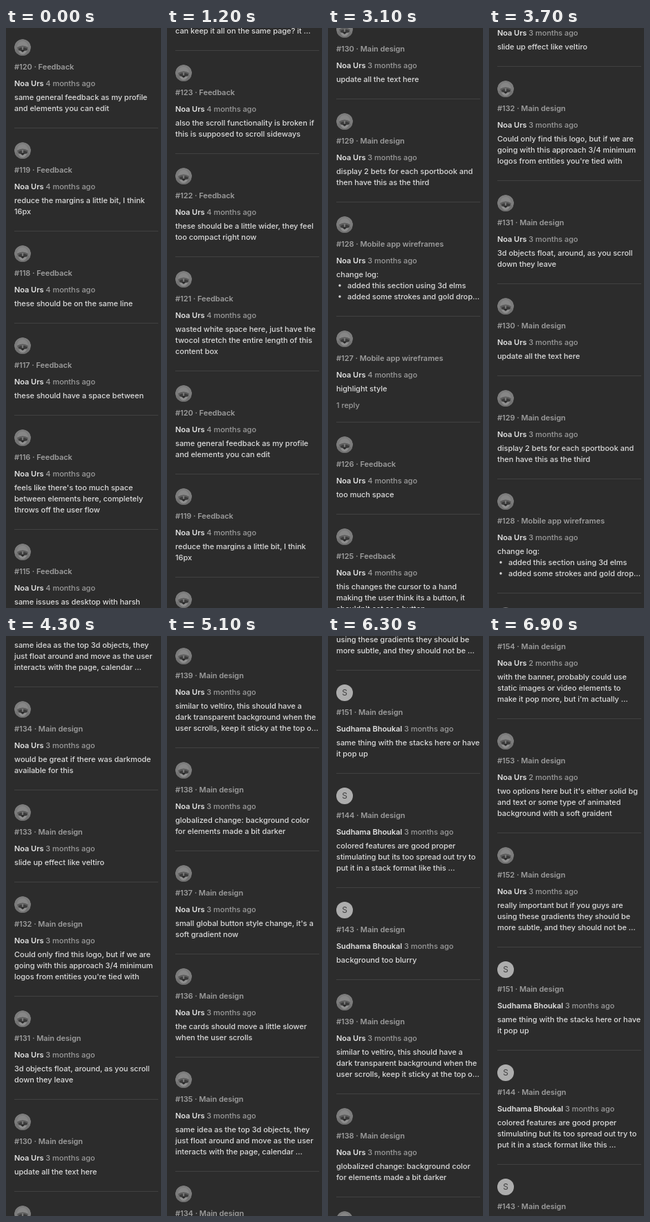
These frames come from a looping animation (224x838 px, 7.2 s). An HTML page:

```html
<!DOCTYPE html>
<html lang="en">
<head>
<meta charset="utf-8">
<title>Comment list</title>
<style>
  html, body { margin: 0; width: 100%; height: 100%; overflow: hidden; background: #2c2c2c; }
  svg { display: block; width: 100%; height: 100%; }
  text { font: 450 11px Inter, sans-serif; letter-spacing: -.04px; fill: #dadada; white-space: pre; }
  .title { font-weight: 600; fill: #9c9c9c; }
  .name { font-weight: 600; fill: #e2e2e2; }
  .dim { fill: #9c9c9c; }
  .initial { font-size: 12px; font-weight: 400; fill: #404040; text-anchor: middle; }
</style>
</head>
<body>
<svg viewBox="0 0 224 838">
  <defs>
    <clipPath id="round"><circle r="12"/></clipPath>
    <g id="photo" clip-path="url(#round)">
      <circle r="12" fill="#7c7c7c"/>
      <path d="M-12 5 L-7 2 L7 2 L12 5 V12 H-12Z" fill="#727272"/>
      <path d="M-8 0 Q-7 -9 0 -9 Q7 -9 8 0 Q0 -4 -8 0Z" fill="#868686"/>
      <path d="M-8 0 Q0 -5 8 0 L7 3 Q0 -1 -7 3Z" fill="#5c5c5c"/>
      <path d="M-6 2 Q0 -2 7 2 Q7 5 3 5 L0 7 L-3 5 Q-6 5 -6 2Z" fill="#3a3a3a"/>
      <path d="M-6 5 Q-3 4 0 7 Q3 4 6 5 Q4 10 0 10 Q-4 10 -6 5Z" fill="#8e8e8e"/>
      <path d="M-1.2 -1 H1.2 L1 4 H-1Z" fill="#777"/>
      <ellipse cy="5" rx="1.8" ry="1.4" fill="#262626"/>
    </g>
  </defs>
  <g id="list"></g>
</svg>
<script>
const LOOP = 7200, STEP = 100, FIRST_Y = -3813;
const A = 'Noa Urs', B = 'Sudhama Bhoukal';
const MAIN = 'Main design', MOBILE = 'Mobile app wireframes', FEED = 'Feedback';

// number, section, author, age in months, text, reply note
const comments = [
  [154, MAIN, A, 2, 'with the banner, probably could use|static images or video elements to|make it pop more, but i\'m actually …'],
  [153, MAIN, A, 2, 'two options here but it\'s either solid bg|and text or some type of animated|background with a soft graident'],
  [152, MAIN, A, 3, 'really important but if you guys are|using these gradients they should be|more subtle, and they should not be …'],
  [151, MAIN, B, 3, 'same thing with the stacks here or have|it pop up'],
  [144, MAIN, B, 3, 'colored features are good proper|stimulating but its too spread out try to|put it in a stack format like this …'],
  [143, MAIN, B, 3, 'background too blurry'],
  [139, MAIN, A, 3, 'similar to veltiro, this should have a|dark transparent background when the|user scrolls, keep it sticky at the top o…'],
  [138, MAIN, A, 3, 'globalized change: background color|for elements made a bit darker'],
  [137, MAIN, A, 3, 'small global button style change, it\'s a|soft gradient now'],
  [136, MAIN, A, 3, 'the cards should move a little slower|when the user scrolls'],
  [135, MAIN, A, 3, 'same idea as the top 3d objects, they|just float around and move as the user|interacts with the page, calendar …'],
  [134, MAIN, A, 3, 'would be great if there was darkmode|available for this'],
  [133, MAIN, A, 3, 'slide up effect like veltiro'],
  [132, MAIN, A, 3, 'Could only find this logo, but if we are|going with this approach 3/4 minimum|logos from entities you\'re tied with'],
  [131, MAIN, A, 3, '3d objects float, around, as you scroll|down they leave'],
  [130, MAIN, A, 3, 'update all the text here'],
  [129, MAIN, A, 3, 'display 2 bets for each sportbook and|then have this as the third'],
  [128, MOBILE, A, 3, 'change log:|*added this section using 3d elms|*added some strokes and gold drop…'],
  [127, MOBILE, A, 4, 'highlight style', '1 reply'],
  [126, FEED, A, 4, 'too much space'],
  [125, FEED, A, 4, 'this changes the cursor to a hand|making the user think its a button, it|shouldn\'t act as a button'],
  [124, FEED, A, 4, 'general fix, but I\'m not liking how this|keeps opening new tabs, maybe we|can keep it all on the same page? it …'],
  [123, FEED, A, 4, 'also the scroll functionality is broken if|this is supposed to scroll sideways'],
  [122, FEED, A, 4, 'these should be a little wider, they feel|too compact right now'],
  [121, FEED, A, 4, 'wasted white space here, just have the|twocol stretch the entire length of this|content box'],
  [120, FEED, A, 4, 'same general feedback as my profile|and elements you can edit'],
  [119, FEED, A, 4, 'reduce the margins a little bit, I think|16px'],
  [118, FEED, A, 4, 'these should be on the same line'],
  [117, FEED, A, 4, 'these should have a space between'],
  [116, FEED, A, 4, 'feels like there\'s too much space|between elements here, completely|throws off the user flow'],
  [115, FEED, A, 4, 'same issues as desktop with harsh|corners']
];

const text = (x, y, body, cls = '') => `<text x="${x}" y="${y}" class="${cls}">${body}</text>`;

function avatar(author, y) {
  return author === A
    ? `<use href="#photo" x="24" y="${y}"/>`
    : `<circle cx="24" cy="${y}" r="12" fill="#adadad"/>` + text(24, y + 4, author[0], 'initial');
}

function textLine(line, y) {
  return line[0] === '*'
    ? `<circle cx="17" cy="${y - 4}" r="1.7" fill="#dadada"/>` + text(28, y, line.slice(1))
    : text(12, y, line);
}

let y = FIRST_Y, markup = '';
for (const [id, section, author, age, body, reply] of comments) {
  const lines = body.split('|');
  markup += avatar(author, y)
    + text(12, y + 32, `#${id} · ${section}`, 'title')
    + text(12, y + 56, `<tspan class="name">${author}</tspan><tspan class="dim"> ${age} months ago</tspan>`)
    + lines.map((line, i) => textLine(line, y + 76 + 16 * i)).join('');
  let end = y + 84 + 16 * (lines.length - 1);
  if (reply) {
    markup += text(12, end + 16, reply, 'dim');
    end += 20;
  }
  markup += `<rect x="12" y="${end + 16}" width="208" height="1" fill="#414141"/>`;
  y = end + 49;
}
const list = document.getElementById('list');
list.innerHTML = markup;

// Wheel flicks: start time, then notches turned every 100 ms
const flicks = [
  [600, 1, 2, 1], [1200, 1, 1], [1500, 1, 1], [2000, 1, 1, 1], [2600, 1, 1, 0],
  [3000, 1, 1, 1, 1, 1, 0], [3700, 1, 1, 1], [4300, 1, 1], [4600, 1, 1],
  [4900, 1, 2, 1], [5500, 1, 1], [6000, 1, 1, 1, 0], [6600, 1, 1, 1, 1]
];

function scrollAt(t) {
  let notches = 0;
  for (const [start, ...turns] of flicks)
    turns.forEach((n, i) => { if (t >= start + 100 * i) notches += n; });
  return notches * STEP;
}

function draw(now) {
  list.setAttribute('transform', `translate(0 ${scrollAt(now % LOOP)})`);
  requestAnimationFrame(draw);
}
draw(performance.now());
</script>
</body>
</html>
```
